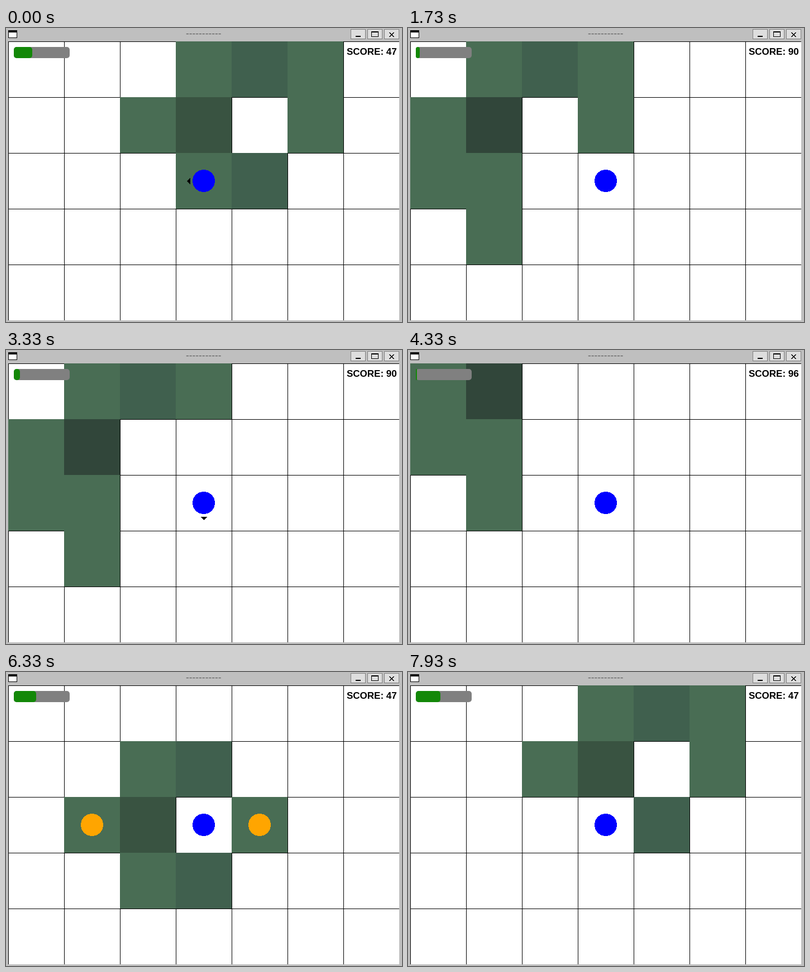
These frames come from a looping animation (709 px wide and 527 px high, 8000 ms). An HTML page with a canvas:

```html
<!DOCTYPE html>
<html>
<head>
<meta charset="utf-8">
<style>
html, body { margin: 0; width: 100%; height: 100%; overflow: hidden; background: #bfbfbf; }
canvas { display: block; }
</style>
</head>
<body>
<canvas id="stage" width="709" height="527"></canvas>
<script>
const ctx = document.getElementById('stage').getContext('2d');
const LOOP = 8000, BIRTH = 4730, STEP = 200;
const CELL = 100, COLS = 7, ROWS = 5, LEFT = 4, TOP = 24;
const GRASS = ['#496d54', '#40604e', '#395341', '#31463a'];
const UPKEEP = 0.8, SEED_COST = 10, BITE = 11, GIFTS = [47, 43, 6];
const DIRS = { R: [1, 0], D: [0, 1], L: [-1, 0], U: [0, -1] };

// One letter per tick: R D L U move, s seeds, e eats, g gives energy for score
const PLAYER = { x: 4, y: 1, plan: '....gsseR.LUDDLes.ReeR..g..LUR.e.D.Dg...' };
const ROVERS = [
  { x: 2, y: 2, plan: '..U.Rs.LUU...U' },
  { x: 3, y: 2, plan: 'D.U.RRUeUUs.' + '.'.repeat(8) + 'Rs.DeUReU' }
];

// Plays one life up to a tick. A seed spreads to its four neighbours one tick later.
function simulate(ticks) {
  const grass = {};
  const grow = (x, y) => { grass[[x, y]] = (grass[[x, y]] || 0) + 1; };
  const agents = [PLAYER, ...ROVERS].map(a => ({ ...a, energy: 100, score: 0, gifts: 0 }));

  for (let i = 0; i < ticks; i++) {
    const sprouts = [];
    for (const a of agents) {
      const act = a.plan[i] || '.';
      const sprouting = a.act === 's';
      if (sprouting) sprouts.push([a.x, a.y]);
      if (!sprouting && act !== 'g') a.energy -= UPKEEP;
      if (DIRS[act]) {
        a.x += DIRS[act][0];
        a.y += DIRS[act][1];
        a.heading = act;
      } else if (act === 's') {
        grow(a.x, a.y);
        a.energy -= SEED_COST;
      } else if (act === 'e') {
        grass[[a.x, a.y]] = 0;
        a.energy += BITE;
      } else if (act === 'g') {
        const gift = GIFTS[a.gifts++];
        a.energy -= gift;
        a.score += gift;
      }
      a.act = act;
    }
    for (const [x, y] of sprouts) {
      for (const [dx, dy] of Object.values(DIRS)) grow(x + dx, y + dy);
    }
  }
  const [player, ...rovers] = agents;
  return { grass, player, rovers };
}

function rect(x, y, w, h, color) {
  ctx.fillStyle = color;
  ctx.fillRect(x, y, w, h);
}

function rounded(x, y, w, h, r, color) {
  ctx.fillStyle = color;
  ctx.beginPath();
  ctx.roundRect(x, y, w, h, Math.min(r, w / 2));
  ctx.fill();
}

// Filled row by row for a hard pixel edge
function disc(col, row, color) {
  const cx = LEFT + col * CELL + 50, cy = TOP + row * CELL + 50, r = 20;
  for (let dy = -r; dy < r; dy++) {
    const half = Math.round(Math.sqrt(r * r - (dy + 0.5) ** 2));
    rect(cx - half, cy + dy, half * 2, 1, color);
  }
}

function text(str, x, y, font) {
  ctx.font = font;
  ctx.fillText(str, Math.round(x - ctx.measureText(str).width), y);
}

function drawWindow() {
  rect(0, 0, 709, 527, '#bfbfbf');
  rect(4, 4, 16, 14, '#000');
  rect(5, 8, 14, 9, '#fff');
  ctx.fillStyle = '#606060';
  text('-----------', 386, 15, '16px "DejaVu Sans", sans-serif');
  for (const x of [617, 647, 677]) {
    rect(x, 2, 27, 18, '#808080');
    rect(x + 1, 3, 25, 16, '#dedede');
  }
  rect(626, 14, 9, 2, '#000');
  rect(654, 6, 13, 10, '#000');
  rect(655, 8, 11, 7, '#dedede');
  for (let i = 0; i < 8; i++) {
    rect(686 + i, 8 + i, 2, 1, '#000');
    rect(693 - i, 8 + i, 2, 1, '#000');
  }
}

function drawField(grass, px, py) {
  for (let row = 0; row < ROWS; row++) {
    for (let col = 0; col < COLS; col++) {
      const x = LEFT + col * CELL, y = TOP + row * CELL;
      const level = grass[[col + px - 3, row + py - 2]];
      if (level) {
        rect(x, y, CELL, CELL, GRASS[Math.min(level, 4) - 1]);
      } else {
        rect(x, y, CELL, CELL, '#000');
        rect(x + 1, y + 1, CELL - 1, CELL - 1, '#fff');
      }
    }
  }
}

function drawHeading([dx, dy]) {
  ctx.save();
  ctx.translate(354.5, 274.5);
  ctx.rotate(Math.atan2(dy, dx));
  ctx.fillStyle = '#000';
  ctx.beginPath();
  ctx.moveTo(24.5, -6);
  ctx.lineTo(30.5, 0);
  ctx.lineTo(24.5, 6);
  ctx.fill();
  ctx.restore();
}

function draw(time) {
  const age = (time - BIRTH + LOOP) % LOOP;
  const wrapped = time < BIRTH ? 1 : 0; // the seam of the loop adds a tick
  const { grass, player, rovers } = simulate(Math.floor(age / STEP) + wrapped);

  drawWindow();
  ctx.save();
  ctx.beginPath();
  ctx.rect(LEFT, TOP, COLS * CELL, ROWS * CELL);
  ctx.clip();
  drawField(grass, player.x, player.y);
  for (const r of rovers) disc(r.x - player.x + 3, r.y - player.y + 2, '#ffa500');
  disc(3, 2, '#00f');
  if (player.heading && 'RDLUs'.includes(player.act)) drawHeading(DIRS[player.heading]);

  rounded(14, 34, 100, 20, 5, '#808080');
  rounded(14, 34, Math.max(0, Math.floor(player.energy)), 20, 5, '#138808');
  ctx.fillStyle = '#000';
  text('SCORE: ' + player.score, 700, 48, 'bold 17px "Liberation Sans", Arial, sans-serif');
  ctx.restore();
}

const start = performance.now();
function frame() {
  draw((performance.now() - start) % LOOP);
  requestAnimationFrame(frame);
}
frame();
</script>
</body>
</html>
```
